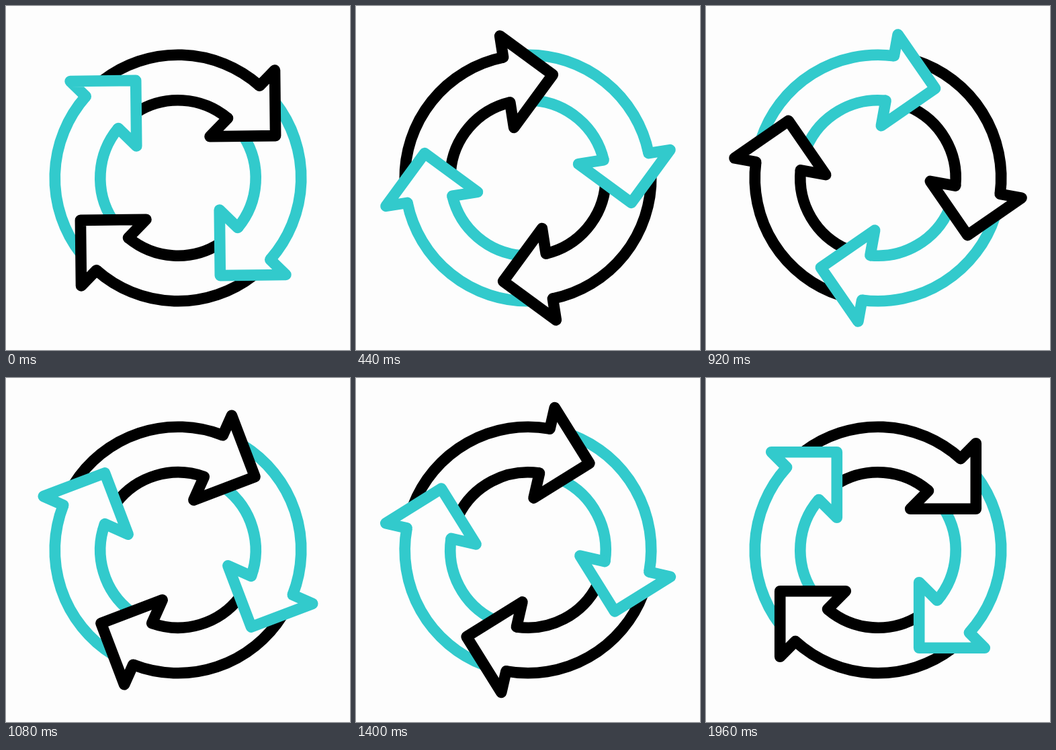
Write an HTML page with a canvas that moves like this. It is 512x512 px and loops after 2 s.

```html
<!DOCTYPE html>
<html lang="en">
<head>
<meta charset="utf-8">
<title>Turning arrows</title>
<style>
html, body { margin: 0; width: 100%; height: 100%; overflow: hidden; background: #fdfdfd; }
canvas { display: block; width: 512px; height: 512px; }
</style>
</head>
<body>
<canvas id="stage" width="512" height="512"></canvas>
<script>
const ctx = document.getElementById('stage').getContext('2d');
const LOOP = 2000, STEP = 40;
const BLACK = '#000', TEAL = '#32cacc', PAPER = '#fdfdfd';
const OUTER = 183.3, INNER = 115.7, LINE = 16.6;
const SWING = 56;

// Arrow head, relative to the centre: notch, barb, tip, barb, notch
const HEAD = [[123, -135.9], [145.8, -158.8], [145.8, -61.2], [48.2, -61.2], [75, -88.1]];

const smooth = s => s * s * (3 - 2 * s);
const clamp = v => Math.min(1, Math.max(0, v));

// Cubic ease with flat ends and handles at x1 and x2
function ease(x, x1, x2) {
  let lo = 0, hi = 1;
  for (let i = 0; i < 30; i++) {
    const s = (lo + hi) / 2, r = 1 - s;
    const at = 3 * r * r * s * x1 + 3 * r * s * s * x2 + s * s * s;
    if (at < x) lo = s; else hi = s;
  }
  return smooth((lo + hi) / 2);
}

// Wind back, then one full turn clockwise
function angleAt(t) {
  if (t < 506) return -SWING * smooth(clamp((t + 34) / 539));
  const x = (t - 506.5) / 1123.5;
  return x >= 1 ? 0 : -SWING + (360 + SWING) * ease(clamp(x), 0.462, 0.541);
}

function arc(radius, from, to) {
  ctx.beginPath();
  ctx.arc(0, 0, radius, Math.atan2(from[1], from[0]), Math.atan2(to[1], to[0]));
  ctx.stroke();
}

function tail() {
  ctx.lineCap = 'butt';
  arc(OUTER, [-111, -145.8], HEAD[0]);
  arc(INNER, [-61.2, -98.2], HEAD[4]);
}

function head() {
  ctx.lineCap = 'round';
  ctx.beginPath();
  HEAD.forEach(p => ctx.lineTo(p[0], p[1]));
  ctx.stroke();
}

function ring(part) {
  for (let i = 0; i < 4; i++) {
    ctx.strokeStyle = i % 2 ? TEAL : BLACK;
    part();
    ctx.rotate(Math.PI / 2);
  }
}

function draw(t) {
  ctx.setTransform(1, 0, 0, 1, 0, 0);
  ctx.fillStyle = PAPER;
  ctx.fillRect(0, 0, 512, 512);
  ctx.translate(256, 256);
  ctx.rotate(angleAt(t) * Math.PI / 180);
  ctx.lineWidth = LINE;
  ctx.lineJoin = 'round';
  ring(tail);
  ring(head);
}

const start = performance.now();
function tick() {
  const t = (performance.now() - start) % LOOP;
  draw(Math.floor(t / STEP) * STEP);
  requestAnimationFrame(tick);
}
tick();
</script>
</body>
</html>
```
